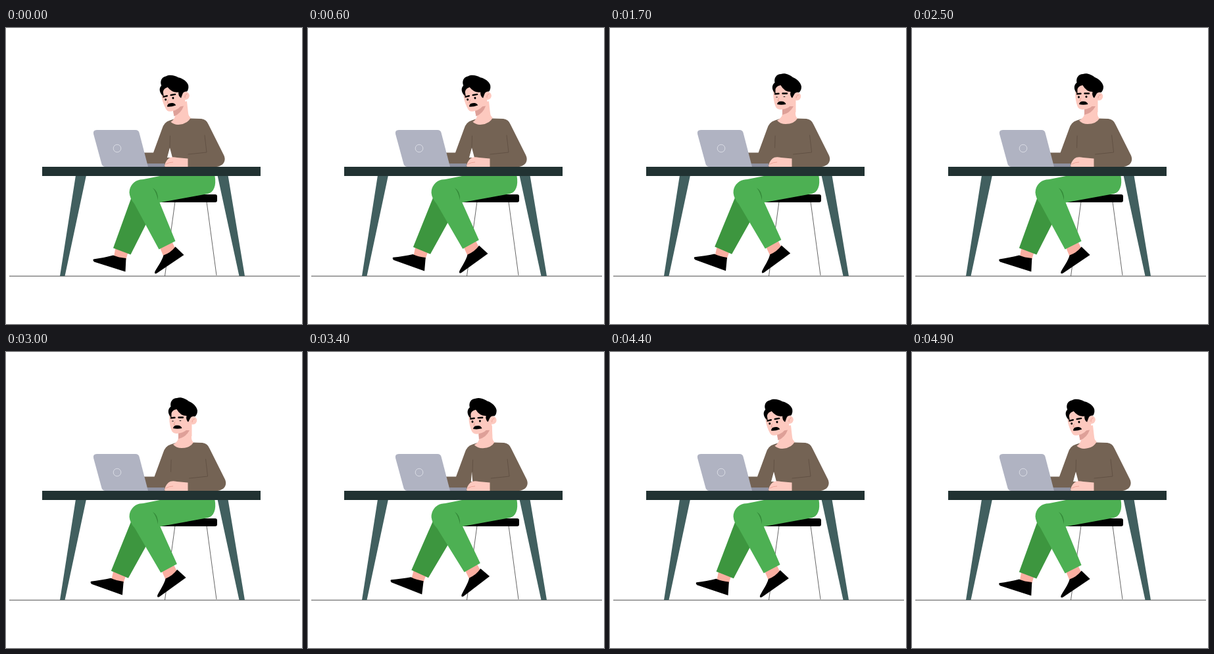
Recreate the animation shown at these times as an HTML page. Size 450 px wide and 450 px high, loop 5 s.

```html
<!DOCTYPE html>
<html lang="en">
<head>
<meta charset="utf-8">
<title>Man at a laptop</title>
<style>
html, body { margin: 0; width: 100%; height: 100%; overflow: hidden; background: #fff; }
svg { display: block; width: 100vw; height: 100vh; }
.skin { fill: #fdc9bf; }
.ankle { fill: #fbafa1; }
.shade { fill: #dea098; }
.shirt { fill: #746354; }
.green { fill: #4db053; }
.line { fill: none; stroke: #5e4d41; stroke-width: .8; stroke-linecap: round; }
.mark { fill: none; stroke: #e79a8d; stroke-width: .8; }
</style>
</head>
<body>
<svg viewBox="0 0 450 450">
  <path d="M5 377.200H447" stroke="#4a4a4a"/>

  <!-- stool -->
  <path d="M257 264L241.500 377M305 264L320 376" stroke="#555" stroke-width=".9"/>
  <path d="M236 265L242 253H318Q321 253 321 256V262Q321 265 318 265Z"/>

  <!-- legs -->
  <g id="backLeg">
    <path class="ankle" d="M167 331L164 348L182 353L186 340Z"/>
    <path d="M133 351.500C143 350 154 348 163 345.500Q171 349 182.500 350L181.500 370.500L134 355.500Q131.500 353 133 351.500Z"/>
    <path fill="#3d963f" d="M192 254L163 334.500L189.500 344.500L218 288L214 250Z"/>
  </g>
  <path class="green" d="M234 225H317.500C320 239 316 250 307 252L233 265.500L205 262L204 231Z"/>
  <g id="frontLeg">
    <path class="ankle" d="M234 334L241 351L260 341L253 326Z"/>
    <path d="M226.500 370C231 362 237 354 239.500 345.500Q250 342 257.500 332.500L270.500 345L229 373Q225 374.500 226.500 370Z"/>
    <path class="green" d="M187.500 250A20 20 0 0 1 204 230.500Q222 230 226 243L233 264L257.500 324L232.500 336.500L195 267Q188 259 187.500 250Z"/>
  </g>
  <path fill="#358a3a" d="M223 243Q232 248 231 262Q229 250 223 243Z"/>

  <!-- body -->
  <g id="body">
    <path class="shirt" d="M205 189.500H224L237 154Q240 143 249 140.500L258 137.500H281L297 138Q305 139 308 147L331 193C336 203 329 211 318 211H214Z"/>
    <path class="line" d="M249.500 164L249 182M302 163L305 189L277 192"/>
  </g>
  <path id="gap" fill="#fff" d="M0 0L-4 15H4Z"/>
  <path id="neck" class="skin" d="M262 116L262 131Q261 137 254 140.500Q259 146 267 146Q280 146 285 137.500Q282 135 282 130V112Z"/>

  <!-- head -->
  <g id="head">
    <path class="skin" d="M262 108V128H282.500V104Z"/>
    <path class="shade" d="M262 119L262 132Q273 130 279 119Z"/>
    <circle class="skin" cx="284" cy="104" r="6.200"/>
    <path class="skin" d="M249 90C247 101 249 113 252 120Q254 124 260 124Q273 123 279 113L282 86L262 80Z"/>
    <path d="M251.500 100C246 95 245 87 250.500 83C249 76 253 70 260 70C266 68 273 71 278 75C284 77 290 83 291 89Q291 95 287.500 98Q282 97 280 101L277 106.500Q273 103 274.500 97Q265 97 259.500 87Q253 88 251.500 93Z"/>
    <path d="M251 100.300L256.500 99.800M262.500 99.500L269 99.500" stroke="#000" stroke-width="2.400" stroke-linecap="round"/>
    <ellipse class="eye" cx="253.500" cy="105" rx="1.500" ry="1.700"/>
    <ellipse class="eye" cx="265" cy="104.500" rx="1.500" ry="1.700"/>
    <path class="mark" d="M257 106L255 110.500H257"/>
    <path d="M254 116Q255 111 260 111.500Q266 111 267.500 116Q260 117.500 254 116Z"/>
    <path class="mark" d="M283 107Q283 102 287 102"/>
  </g>

  <!-- hand -->
  <path class="skin" d="M241 210Q242 203 247 198.500Q251 195 260 197L276.500 198.500V211H242Z"/>
  <path class="mark" d="M243 207Q248 204 254 204"/>

  <!-- laptop -->
  <path fill="#8e909f" d="M211 206H241V211H211Z"/>
  <path fill="#b0b3c2" d="M138 155H197Q201 155 202.500 159L216 211H151Q147 211 145.500 207L133 161Q132 155 138 155Z"/>
  <circle cx="169" cy="183" r="5.800" fill="none" stroke="#dddfe7" stroke-width=".9"/>

  <!-- table -->
  <path fill="#415f5f" d="M106 224H122L89.500 377H82ZM321.500 224H337.500L363 377H354.500Z"/>
  <path fill="#213232" d="M55 211H387V225H55Z"/>
</svg>
<script>
const LOOP = 5000, SWING = 2390;
const BLINKS = [420, 1700, 2980, 4260];
const $ = id => document.getElementById(id);
const eyes = document.querySelectorAll('.eye');
const ease = (t, from, to) => {
  const s = Math.min(1, Math.max(0, (t - from) / (to - from)));
  return s * s * (3 - 2 * s);
};
const set = (id, value) => $(id).setAttribute('transform', value);

function draw(t) {
  const swing = (1 - Math.cos(2 * Math.PI * t / SWING)) / 2;
  set('backLeg', `rotate(${4.2 * swing} 205 250)`);
  set('frontLeg', `rotate(${-3.6 * swing} 207 249)`);

  // the head lifts, then returns to the screen
  const up = ease(t, 700, 1500) - ease(t, 3100, 3900);
  const tilt = -9.2 * (1 - up);
  set('head', `rotate(${tilt} 272 174)`);
  set('neck', `rotate(${tilt * .7} 272 174)`);
  set('body', `translate(${1.6 * up} 0)`);
  set('gap', `translate(249 182) scale(${1 - up} 1)`);

  const gap = Math.min(...BLINKS.map(b => Math.abs(t - b)));
  const open = Math.max(.3, Math.min(1, gap / 120));
  eyes.forEach(e => e.setAttribute('ry', 1.7 * open));
}

function frame(now) {
  draw(now % LOOP);
  requestAnimationFrame(frame);
}
draw(0);
requestAnimationFrame(frame);
</script>
</body>
</html>
```
